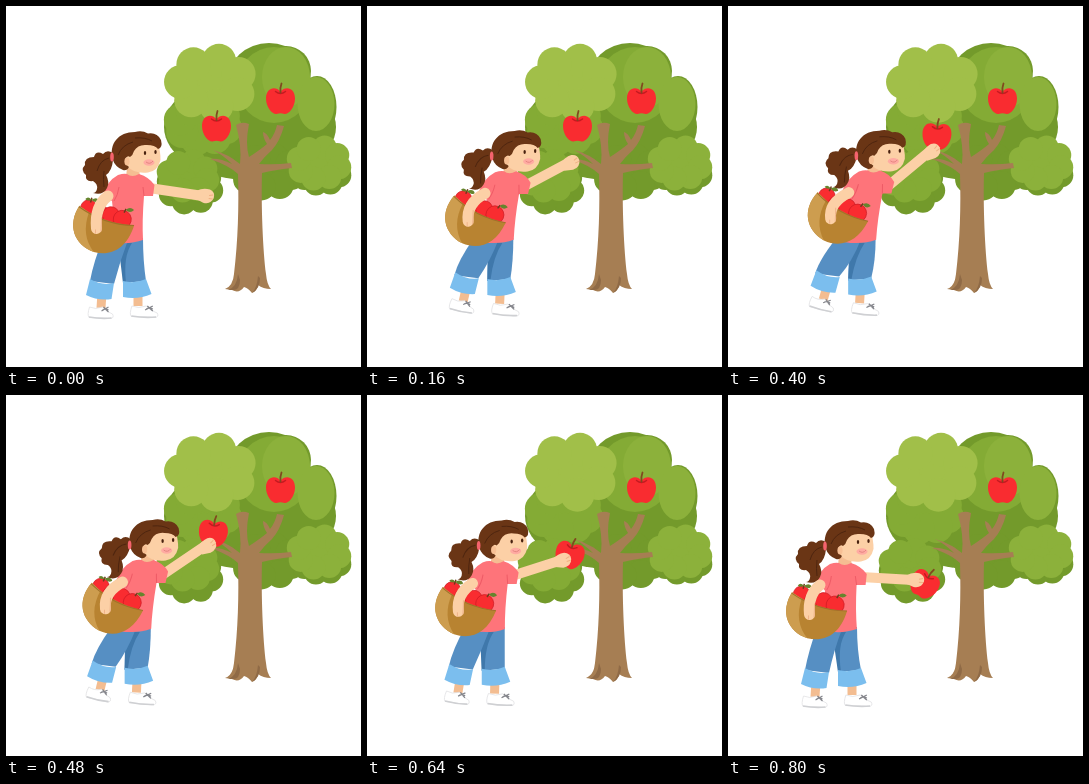
Recreate the animation shown at these times as an HTML page. Size 355x361 px, loop 1600 ms.

```html
<!DOCTYPE html>
<html lang="en">
<head>
<meta charset="utf-8">
<title>Picking apples</title>
<style>
  html, body { margin: 0; width: 100%; height: 100%; overflow: hidden; background: #fff; }
  svg { display: block; width: 100%; height: 100%; }
</style>
</head>
<body>
<svg viewBox="0 0 355 361" preserveAspectRatio="none">
  <defs>
    <g id="apple">
      <path fill="#f92c30" d="M0-9C-5-15-14.500-13-14.500-2C-14.500 7-8 14-4 13.500Q0 12 4 13.500C8 14 14.500 7 14.500-2C14.500-13 5-15 0-9Z"/>
      <path fill="none" stroke="#c51a21" stroke-width="1.500" stroke-linecap="round" d="M-5-9Q0-5 5-9"/>
      <path fill="none" stroke="#81491f" stroke-width="1.800" stroke-linecap="round" d="M0-8Q-.5-13 1-17"/>
    </g>
    <g id="shoe">
      <path fill="#fff" stroke="#e3e3e5" stroke-width=".8" d="M-11-6Q-13.500 2-11.500 4.500L10 5.500Q14 5 12 1Q6-1 2-6Q-5-3-11-6Z"/>
      <path fill="none" stroke="#cfd0d3" stroke-width="1.600" d="M-11.500 4Q0 6 11 5"/>
      <path fill="none" stroke="#85868c" stroke-width="1.200" d="M1-2L8-6M3-6L8-1M2-3Q5-5 8-3"/>
    </g>
  </defs>
  <g id="leaves"></g>
  <path fill="#a67e53" d="M232 168Q224 160 204 153Q214 152 226 158Q217 149 207 144Q222 148 234 158Q236 140 230 119Q236 115 243 118Q239 138 243 151Q254 144 261 138Q257 132 257 126Q261 127 264 134Q269 128 271 119L278 120Q274 135 266 144Q258 151 253 158Q270 159 285 157L286 162Q268 164 256 167C255 200 257 245 260 268Q261 279 265 283Q257 283 252 279Q251 285 246 287Q242 282 238 281Q233 288 226 284L219 283Q227 280 228 268C232 235 233 200 232 168Z"/>
  <path fill="#8f6a46" d="M232 268Q231 281 222 284L227 284Q234 284 234 274ZM252 270Q251 282 246 287Q254 283 254 272Z"/>
  <use href="#apple" x="274.500" y="94.500"/>
  <use href="#apple" id="picked"/>
  <path id="farArm" fill="none" stroke="#fcd0a6" stroke-width="10" stroke-linecap="round"/>
  <g id="fist">
    <path fill="#fcd0a6" d="M-10-4Q-4-8 3-7Q9-5 8 1Q6 8-2 7L-10 4Z"/>
    <path fill="none" stroke="#eeb083" d="M7-2L3-1M7 2L3 2"/>
  </g>
  <g id="rightFoot"><path stroke="#f3bd91" stroke-width="9" d="M132 287V300"/><use href="#shoe" transform="translate(138 306) scale(1.100 1)"/></g>
  <g id="leftFoot"><path stroke="#f3bd91" stroke-width="9" d="M96 287L95 302"/><use href="#shoe" x="94.500" y="307"/></g>
  <path id="rightLeg" fill="#568fc3"/>
  <path id="legShade" fill="#3f78ab"/>
  <path id="rightCuff" fill="#7bbeee" d="M117 275Q129 278 140 273L145.500 288Q132 294 117 291Z"/>
  <path id="leftLeg" fill="#568fc3"/>
  <path id="leftCuff" fill="#7bbeee" d="M84 273Q96 280 108 277L105.500 293Q92 295 80 289Z"/>
  <g id="torso">
    <path fill="#f5bd92" d="M121 162H133L134 171Q127 176 120 171Z"/>
    <path fill="#fe747a" d="M112 169Q118 167 121 168Q126 172 133 168Q143 171 148.500 179L147 190L138 190Q136 215 137 234Q123 239 105 236Q109 215 106 195L97 189Q101 175 112 169Z"/>
    <path fill="none" stroke="#ee5b66" d="M113 181Q112 189 108 195M138 190L137 181"/>
  </g>
  <g id="head">
    <g id="tail">
      <path fill="#6a3515" d="M107 147Q101 143 97 148Q90 144 88 151Q78 151 79 159Q74 164 80 169Q79 176 87 175Q92 178 91 183Q90 187 87 187Q97 190 101 182Q104 176 100 169Q106 165 107 154Z"/>
      <path fill="none" stroke="#4e250f" d="M103 152Q94 154 91 165M98 165Q97 174 98 181"/>
    </g>
    <path fill="#fcd0a6" d="M119 134L151 131Q155 148 154.500 154Q152 165 142 166.500Q128 168 121 160Z"/>
    <path fill="#6a3515" d="M106.500 153C103 138 112 126 129 126Q136 124 142 127.500Q151 126 155 134Q157 142 152 143Q149 139 141 139Q132 138 128 145Q127 149 124 151Q121 149 119.500 153Q119 158 123 161Q121 165 117 164Q109 161 106.500 153Z"/>
    <path fill="none" stroke="#4e250f" d="M112 149Q116 139 127 136M129 132Q139 131 146 135"/>
    <ellipse cx="106" cy="151" rx="1.800" ry="4.500" fill="#f5636d"/>
    <ellipse cx="121" cy="155.500" rx="2.600" ry="4" fill="#f7c095"/>
    <ellipse cx="143" cy="156.500" rx="5.500" ry="3.200" fill="#ffaba2"/>
    <path fill="none" stroke="#e58581" d="M140 156Q144 159 147 155"/>
    <g fill="#48210f"><ellipse cx="139" cy="147" rx="1.200" ry="2"/><ellipse cx="149.500" cy="146" rx="1.200" ry="2"/></g>
  </g>
  <g id="basket">
    <g fill="#f92c30" stroke="#cf1c24" stroke-width=".7">
      <circle cx="-18" cy="-15" r="8.500"/><circle cx="-5" cy="-12" r="9"/><circle cx="5" cy="-14" r="8.500"/><circle cx="17" cy="-13" r="9"/>
    </g>
    <path fill="none" stroke="#6d3c1c" stroke-width="1.500" d="M-18-21L-18-26M17-20L18-24"/>
    <path fill="#66842d" d="M-18-24Q-13-29-10-25Q-13-21-18-24M18-23Q21-28 26-25Q23-20 18-23M-18-24Q-22-27-24-23Q-21-21-18-24"/>
    <path fill="#b88331" d="M-28-15C-35 7-23 24-2 26C16 26 29 14 30-10Q0-4-28-15Z"/>
    <path fill="#cd9d4f" d="M-28-15C-35 7-23 24-2 26Q-19 13-17-11Z"/>
    <path fill="none" stroke="#a07029" d="M-28-14Q0-3 30-10"/>
  </g>
  <path id="nearArm" fill="none" stroke="#fcd0a6" stroke-width="11" stroke-linecap="round"/>
  <path id="armEdge" fill="none" stroke="#efb389"/>
</svg>
<script>
const el = id => document.getElementById(id);
const set = (id, name, value) => el(id).setAttribute(name, value);
const move = (id, x, y, turn = 0, cx = 0, cy = 0) =>
  set(id, 'transform', `translate(${x} ${y}) rotate(${turn} ${cx} ${cy})`);

const dark = '#739a2b', mid = '#84ab35', pale = '#8cb13b', light = '#a1bf49';
const oval = (fill, x, y, rx, ry) => `<ellipse fill="${fill}" cx="${x}" cy="${y}" rx="${rx}" ry="${ry}"/>`;

// an oval core ringed with n puffs of radius r
function cluster(fill, x, y, rx, ry, r, n = 8) {
  let out = oval(fill, x, y, rx + r / 2, ry + r / 2);
  for (let i = 0; i < n; i++) {
    const a = i / n * Math.PI * 2 - 1.3;
    out += oval(fill, x + rx * Math.cos(a), y + ry * Math.sin(a), r, r);
  }
  return out;
}

el('leaves').innerHTML =
  oval(dark, 263, 76, 42, 39) + oval(dark, 280, 65, 25, 25) + oval(dark, 311, 101, 19.5, 31) +
  oval(dark, 244, 121, 86, 53) +
  cluster(dark, 262, 166, 24, 15, 14) + cluster(dark, 315, 166, 19, 12, 12) +
  cluster(dark, 184, 180, 22, 17, 12) +
  cluster(mid, 197, 118, 24, 16, 16) + oval(mid, 268, 79, 37, 38) + oval(pale, 280, 71, 24, 30) +
  oval(pale, 310, 98, 18.5, 27) +
  cluster(mid, 182, 170, 20, 15, 12) + cluster(pale, 313, 157, 21, 16, 12) +
  cluster(light, 205, 77, 30, 23, 17, 7);

// each part at rest, at full reach and at the end
const torso = {
  head: [0, 28, -9],
  chest: [0, 24, -10],
  hem: [0, 14, -8],
  lift: [0, -4, 0],
  cuff: [0, 5, -7],
  foot: [0, .5, -8],
  baskX: [96.5, 112.5, 87.5],
  baskY: [221.5, 210.5, 218.5],
  baskR: [15, 27, 14]
};
const grip = {
  handX: [200, 207, 188],
  handY: [190, 140, 185],
  appleX: [210.5, 210.5, 196.5],
  appleY: [122, 122, 189],
  appleR: [0, 0, 30]
};
const reachStep = 6, endStep = 20;

function blend(poses, step, power) {
  const out = {};
  for (const [name, [rest, reach, end]] of Object.entries(poses)) {
    out[name] = step < reachStep
      ? rest + (reach - rest) * step / reachStep
      : reach + (end - reach) * ((step - reachStep) / (endStep - reachStep)) ** power;
  }
  return out;
}

function draw(step) {
  const p = { ...blend(torso, step, 1.5), ...blend(grip, step, 1.7) };
  const { chest, hem: h, cuff: c, lift } = p;

  const lean = (h - chest) / 68, stretch = 1 - lift / 68;
  set('torso', 'transform', `matrix(1 0 ${-lean * -1} ${stretch} ${chest - 170 * lean} ${238 * (1 - stretch)})`);
  move('head', p.head, lift * .35);
  move('tail', 0, lift * .6, lift * -2.2, 106, 150);

  const ly = lift * 2.2, ry = lift * .75;
  set('leftLeg', 'd', `M${97 + h} 233L${122 + h} 234Q${114 + h} 255 ${108 + c} ${278 + ly}L${84 + c} ${275 + ly}Q${88 + c} 254 ${97 + h} 233Z`);
  set('rightLeg', 'd', `M${112 + h} 233L${137 + h} 232Q${137 + h} 255 ${140 + c} ${275 + ry}L${117 + c} ${277 + ry}Q${117 + c} 256 ${112 + h} 233Z`);
  set('legShade', 'd', `M${112 + h} 236L${126 + h} 237Q${117 + h} 250 ${120 + c} ${277 + ry}L${117 + c} ${277 + ry}Z`);
  move('leftCuff', c, ly, -lift * 2, 95, 283);
  move('rightCuff', c, ry);
  move('leftFoot', p.foot, lift * 2.5, -lift * 3.5, 94.5, 307);
  move('rightFoot', p.foot, ry, -lift, 138, 306);

  const sx = 143 + chest, sy = 182 + lift;
  const angle = Math.atan2(p.handY - sy, p.handX - sx) * 180 / Math.PI;
  set('farArm', 'd', `M${sx} ${sy}L${p.handX - 3} ${p.handY}`);
  move('fist', p.handX, p.handY, angle);
  move('picked', p.appleX, p.appleY, p.appleR);

  move('basket', p.baskX, p.baskY, p.baskR);
  const ax = 102 + chest, ay = 190 + lift, hx = p.baskX - 6, hy = p.baskY + 1;
  set('nearArm', 'd', `M${ax} ${ay}Q${hx - 2} ${ay + 10} ${hx} ${hy}`);
  set('armEdge', 'd', `M${hx + 5} ${hy - 11}Q${hx + 5} ${hy - 4} ${hx + 4.5} ${hy + 3}M${hx - 1} ${hy + 1}v4`);
}

let last = -1;
function tick(now) {
  const step = Math.min(endStep, Math.floor(now % 1600 / 40));
  if (step !== last) draw(last = step);
  requestAnimationFrame(tick);
}
draw(0);
requestAnimationFrame(tick);
</script>
</body>
</html>
```
